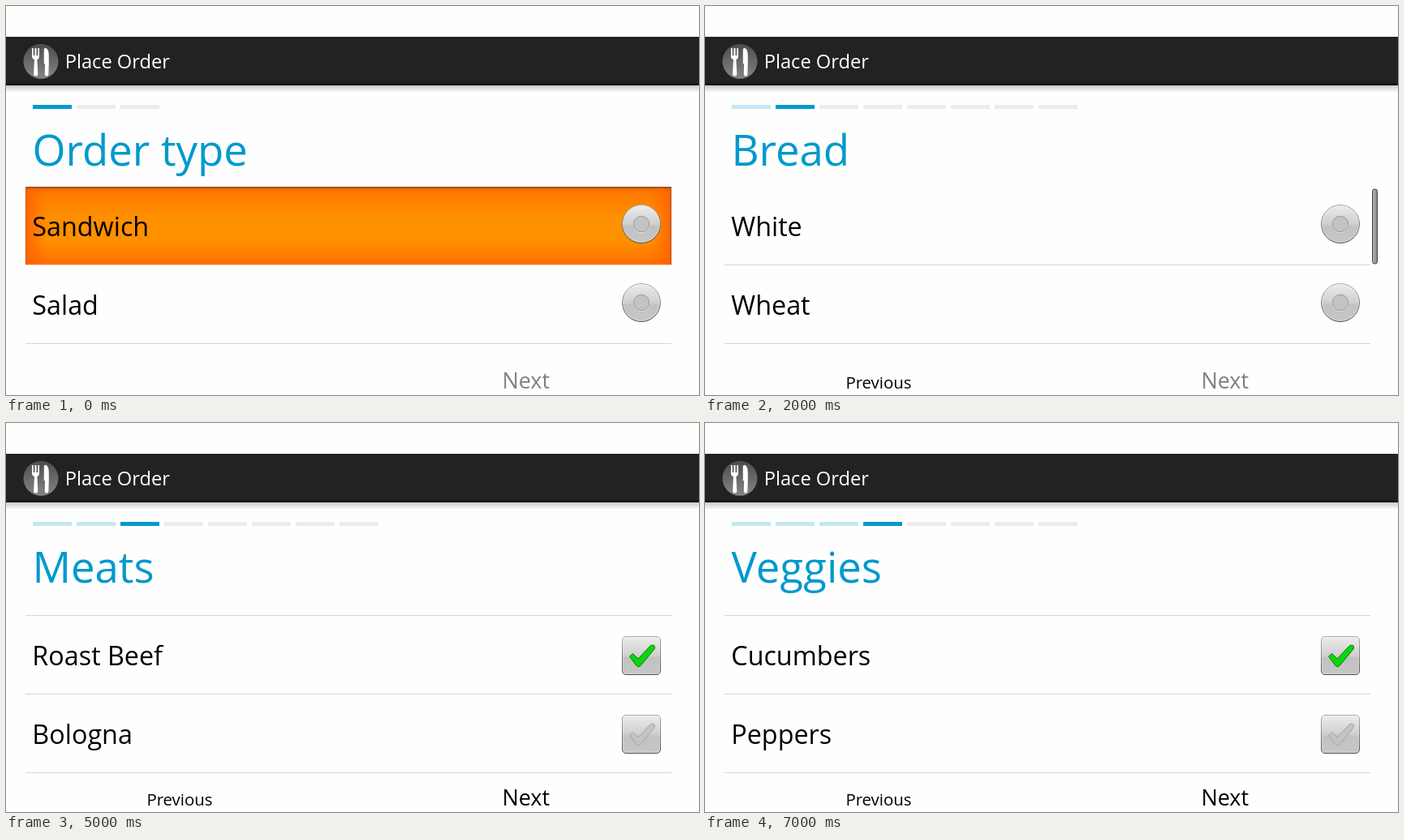
These frames come from a looping animation (854x480 px, 8000 ms). An HTML page:

```html
<!DOCTYPE html>
<html lang="en">
<head>
<meta charset="utf-8">
<title>Place Order</title>
<style>
  html, body { margin: 0; width: 100%; height: 100%; overflow: hidden; background: #fefefe; }
  svg { display: block; width: 854px; height: 480px; }
  text { font-family: "Open Sans", "Noto Sans", sans-serif; white-space: pre; }
  .title { font-size: 52.7px; fill: #0099cc; }
  .label { font-size: 32.3px; }
  .next { font-size: 27px; }
  .prev { font-size: 20.4px; }
  .off { fill: #808080; }
</style>
</head>
<body>
<svg viewBox="0 0 854 480" xmlns="http://www.w3.org/2000/svg">
  <defs>
    <linearGradient id="shade" x2="0" y2="1">
      <stop offset="0" stop-color="#000" stop-opacity=".2"/>
      <stop offset="1" stop-color="#000" stop-opacity="0"/>
    </linearGradient>
    <linearGradient id="badge" x2="0" y2="1">
      <stop offset="0" stop-color="#4c4c4c"/>
      <stop offset="1" stop-color="#858585"/>
    </linearGradient>
    <linearGradient id="metal" x2="0" y2="1">
      <stop offset="0" stop-color="#ececec"/>
      <stop offset=".5" stop-color="#cfcfcf"/>
      <stop offset=".56" stop-color="#c2c2c2"/>
      <stop offset="1" stop-color="#c6c6c6"/>
    </linearGradient>
    <linearGradient id="rim" x2="0" y2="1">
      <stop offset="0" stop-color="#aaa"/>
      <stop offset="1" stop-color="#505050"/>
    </linearGradient>
    <linearGradient id="glow" x2="0" y2="1">
      <stop offset="0" stop-color="#f56a00"/>
      <stop offset=".1" stop-color="#ff7b00"/>
      <stop offset=".4" stop-color="#ff9000"/>
      <stop offset=".68" stop-color="#ff9000"/>
      <stop offset="1" stop-color="#ff6d00"/>
    </linearGradient>
    <linearGradient id="sides">
      <stop offset="0" stop-color="#ff5a00" stop-opacity=".8"/>
      <stop offset=".035" stop-color="#ff6a00" stop-opacity="0"/>
      <stop offset=".965" stop-color="#ff6a00" stop-opacity="0"/>
      <stop offset="1" stop-color="#ff5a00" stop-opacity=".8"/>
    </linearGradient>
    <linearGradient id="thumb">
      <stop offset="0" stop-color="#b4b4b4"/>
      <stop offset="1" stop-color="#888"/>
    </linearGradient>
    <path id="tick" d="M9.5 25 L13.5 21.5 L20 28 L35.5 11.5 Q39 10 40.5 12.5 L40 16 L23 36.5 Q20.5 39 18 36.5 Z" stroke-linejoin="round"/>
    <g id="radio">
      <circle cx="24" cy="24" r="23.5" fill="url(#metal)" stroke="url(#rim)"/>
      <circle cx="24" cy="24" r="22.3" fill="none" stroke="#fff" stroke-opacity=".3"/>
      <circle cx="24" cy="24.6" r="10" fill="none" stroke="#e4e4e4"/>
    </g>
    <g id="box">
      <rect x=".5" y=".5" width="47" height="47" rx="4.5" fill="url(#metal)" stroke="url(#rim)"/>
      <rect x="1.6" y="1.6" width="44.8" height="44.8" rx="3.5" fill="none" stroke="#fff" stroke-opacity=".3"/>
    </g>
  </defs>
  <rect width="854" height="480" fill="#fefefe"/>
  <rect y="98" width="854" height="9" fill="url(#shade)"/>
  <rect y="38" width="854" height="60" fill="#222"/>
  <rect y="95" width="854" height="3" fill="#181818"/>
  <circle cx="43" cy="68.3" r="21.5" fill="url(#badge)"/>
  <g fill="#fff">
    <path d="M32 52h1.7v9h1.8v-9h2v9h1.8v-9H41v10q0 3-2.6 4l.9 18q0 2.5-2.6 2.5t-2.6-2.5l.9-18q-3-1-3-4z"/>
    <path d="M46.8 54q0-2.2 2-2.2 4 1 4 10v9l-.4 13.500q0 2.200-2.300 2.200t-2.300-2.200l.3-13h-1.300z"/>
  </g>
  <text x="72.700" y="77" font-size="23.7" fill="#fff">Place Order</text>
  <g id="pages"></g>
</svg>
<script>
const STEP = 1000;
const ORDER = { title: "Order type", rows: ["Sandwich", "Salad"], kind: "radio", page: 0 };
const BREAD = { title: "Bread", rows: ["White", "Wheat"], kind: "radio", page: 1 };
const MEATS = { title: "Meats", kind: "box", page: 2, next: true };
const VEGGIES = { title: "Veggies", kind: "box", page: 3, next: true };

const scenes = [
  { ...ORDER, bars: 3, pressed: true },
  { ...ORDER, next: true },
  { ...BREAD, thumb: 93 },
  { ...BREAD, next: true, on: 0 },
  { ...MEATS, rows: ["Pepperoni", "Turkey"], thumb: 77 },
  { ...MEATS, rows: ["Roast Beef", "Bologna"], top: 238, on: 0 },
  { ...VEGGIES, rows: ["Tomatoes", "Lettuce"], shift: 3 },
  { ...VEGGIES, rows: ["Cucumbers", "Peppers"], top: 238, on: 0 }
];

const rect = (x, y, w, h, fill, more = "") =>
  `<rect x="${x}" y="${y}" width="${w}" height="${h}" fill="${fill}" ${more}/>`;
const text = (x, y, cls, str) => `<text x="${x}" y="${y}" class="${cls}">${str}</text>`;
const line = y => rect(24, y, 796, 1, "#d6d6d6");

function steps(count, page) {
  let out = "";
  for (let i = 0; i < count; i++) {
    const fill = i < page ? "#c3e7f4" : i === page ? "#0099cc" : "#ececec";
    out += rect(33 + i * 54, 122, 48, 5, fill);
  }
  return out;
}

function control(kind, y, on) {
  const top = y + (kind === "radio" ? 22 : 25);
  const mark = kind === "radio"
    ? `<circle cx="24" cy="24" r="9.7" fill="${on ? "#00d000" : "#c3c3c3"}" stroke="${on ? "#087808" : "#999"}"/>`
    : `<use href="#tick" fill="${on ? "#0bd60b" : "#c4c4c4"}" stroke="${on ? "#067806" : "#a2a2a2"}"/>`;
  return `<g transform="translate(759 ${top})"><use href="#${kind}"/>${mark}</g>`;
}

const highlight = y =>
  rect(24, y, 796, 97, "url(#glow)") +
  rect(24, y, 796, 97, "url(#sides)") +
  rect(24, y, 796, 1, "#8a4a10") +
  rect(24, y + 1, 796, 2, "#a84800", 'opacity=".4"') +
  rect(24, y, 1, 96, "#b85000", 'opacity=".7"') +
  rect(819, y, 1, 96, "#9a4400", 'opacity=".8"') +
  rect(24, y + 96, 796, 1, "#ffd0a8");

function draw({ title, rows, kind, page, bars = 8, top = 223, shift = 0, on, next, pressed, thumb }) {
  let list = text(32.4, 197, "title", title);
  if (top > 223) list += line(top - 1);
  rows.forEach((name, i) => {
    const y = top + i * 97;
    list += pressed && i === 0 ? highlight(y) : line(y + 96);
    list += text(32.3, y + 61, "label", name) + control(kind, y, i === on);
  });
  if (thumb) list += rect(822.5, 226, 6, thumb - 1, "url(#thumb)", 'rx="2.5" stroke="#444"');
  return steps(bars, page) +
    `<g transform="translate(${shift} 0)">${list}</g>` +
    (page ? text(173.4, 472, "prev", "Previous") : "") +
    text(611.4, 472, next ? "next" : "next off", "Next");
}

const pages = document.getElementById("pages");
pages.innerHTML = scenes.map(s => `<g visibility="hidden">${draw(s)}</g>`).join("");

let shown = -1;
function show(index) {
  if (index === shown) return;
  [...pages.children].forEach((g, i) => g.setAttribute("visibility", i === index ? "visible" : "hidden"));
  shown = index;
}

const start = performance.now();
function tick() {
  show(Math.floor((performance.now() - start) / STEP) % scenes.length);
  requestAnimationFrame(tick);
}
show(0);
requestAnimationFrame(tick);
</script>
</body>
</html>
```
